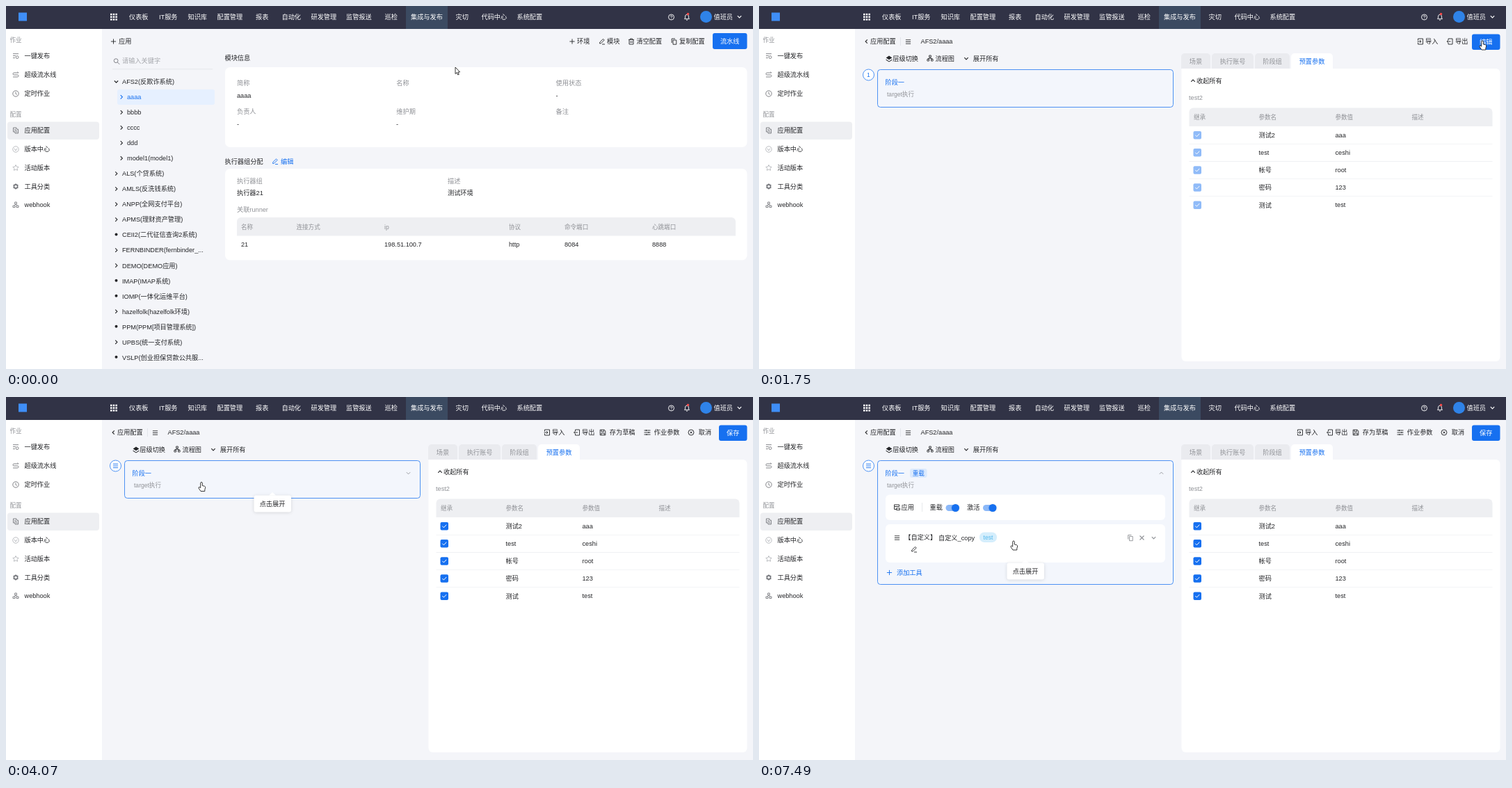
An HTML page with a canvas for the animation above (8000 ms loop, 1074 by 522 pixels).

```html
<!DOCTYPE html>
<html lang="zh-CN">
<head>
<meta charset="utf-8">
<title>应用配置</title>
<style>
html, body { margin: 0; width: 100%; height: 100%; overflow: hidden; background: #f4f5f9; }
canvas { display: block; }
</style>
</head>
<body>
<canvas id="stage" width="1074" height="522"></canvas>
<script>
const ctx = document.getElementById('stage').getContext('2d');
const LOOP = 8000;
const FONT = '"Liberation Sans", Arial, "Noto Sans CJK SC", "Noto Sans CJK", sans-serif';
const SIZE = 9.2, SMALL = 8.55;
const BLUE = '#1670f0', INK = '#252629', GREY = '#909297', BG = '#f4f5f9', HEAD = '#eeeff2';

// Line icons, centred on 0,0
const ICONS = {
  plus: 'M-3.6 0H3.6M0-3.6V3.6',
  down: 'M-2.7-1.3L0 1.4 2.7-1.3',
  up: 'M-2.7 1.3L0-1.4 2.7 1.3',
  right: 'M-1.3-2.7L1.4 0-1.3 2.7',
  left: 'M1.3-2.7L-1.4 0 1.3 2.7',
  menu: 'M-3.6-2.7H3.6M-3.6 0H3.6M-3.6 2.7H3.6',
  pencil: 'M-3.2 1L1.6-3.6 3.2-2-1.5 2.7-3.4 3ZM0 4H4',
  trash: 'M-4-2.6H4M-1.5-2.6V-4H1.5V-2.6M-3-2.6V4H3V-2.6M-1-.5V2M1-.5V2',
  copy: 'M-1.5-2H3.3V4.2H-1.5ZM-3.3 2V-4H1.5',
  search: 'M2-.8A2.9 2.9 0 1 1-3.8-.8 2.9 2.9 0 1 1 2-.8M1.3 1.4L4.3 4.4',
  enter: 'M-3.5-1.5V-4H3.5V4H-3.5V1.5M-4.4 0H1M-.8-1.8L1 0-.8 1.8',
  leave: 'M-2.5-2V-4H3.5V4H-2.5V2M1 0H-4.4M-2.6-1.8L-4.4 0-2.6 1.8',
  save: 'M-3.8-3.8H2.2L3.8-2.2V3.8H-3.8ZM-2-3.8V-1.2H1.6V-3.8M-2.2 3.8V1H2.2V3.8',
  sliders: 'M-4.5-3H4.5M-4.5 0H4.5M-4.5 3H4.5M-1.5-4V-2M2-1V1M-1 2V4',
  cancel: 'M4 0A4 4 0 1 1-4 0 4 4 0 1 1 4 0M-1.5-1.5L1.5 1.5M1.5-1.5L-1.5 1.5',
  cross: 'M-3-3L3 3M3-3L-3 3',
  flow: 'M-1.3-4H1.3V-1.4H-1.3ZM0-1.4V.3M-2.8 1.5V.3H2.8V1.5M-4.1 1.5H-1.5V4H-4.1ZM1.5 1.5H4.1V4H1.5Z',
  help: 'M4 0A4 4 0 1 1-4 0 4 4 0 1 1 4 0M-1.4-.8Q-1.3-2.2 0-2.2 1.4-2.2 1.4-1 1.4-.2 0 .6V1M0 2V2.6',
  bell: 'M-3.4 2.6H3.4L2.5 1V-1.2Q2.3-3.6 0-3.6-2.3-3.6-2.5-1.2V1ZM-1 4.2H1',
  tasks: 'M-4-3.3H4M-4-.4H0M-4 2.6H-1M4 1.6A1.9 1.9 0 1 1 .2 1.6 1.9 1.9 0 1 1 4 1.6',
  swap: 'M4-3H-2.4Q-4-3-4-1.4T-2.4 0H2.4Q4 0 4 1.5T2.4 3H-4M2.5-4.3L4-3',
  clock: 'M4.2 0A4.2 4.2 0 1 1-4.2 0 4.2 4.2 0 1 1 4.2 0M0-2.5V.3L1.8 1.4',
  doc: 'M-3.5-4H1V-1.8H3.5V4H-1V2H-3.5ZM-1.8-1.5H0M-1.8.4H1.8M.4 2.2H2.2',
  version: 'M4.2 0A4.2 4.2 0 1 1-4.2 0 4.2 4.2 0 1 1 4.2 0M-2-1.2L0 2 2-1.2',
  star: 'M0-4L1.3-1.4 4.1-1 2.1 1 2.6 3.8 0 2.5-2.6 3.8-2.1 1-4.1-1-1.3-1.4Z',
  gear: 'M2.6 0A2.6 2.6 0 1 1-2.6 0 2.6 2.6 0 1 1 2.6 0M0-4V-2.6M0 4V2.6M-3.5-2L-2.2-1.3M3.5 2L2.2 1.3M-3.5 2L-2.2 1.3M3.5-2L2.2-1.3',
  nodes: 'M-1.3-4H1.3V-1H-1.3ZM-4 1H-1V3.6H-4ZM1 1H4V3.6H1ZM0-1L-2 1M0-1L2 1',
  app: 'M-4-3.6H3V-1H-4ZM-4-1V3H-1M-1 1.4H4V4H-1Z',
  check: 'M-2.9-.2L-.8 2 3-2.1',
};
for (const k in ICONS) ICONS[k] = new Path2D(ICONS[k]);
const LAYERS = new Path2D('M0-4.4L4.4-1.6 0 1.2-4.4-1.6ZM-4.4.6L0 3.4 4.4.6V1.8L0 4.6-4.4 1.8Z');
const HAND = new Path2D('M-1.3 1.2Q-1.3 0 0 0 1.3 0 1.3 1.2V5L4.6 5.8Q5.9 6.3 5.6 8L4.8 10.8V13H-1L-4 8.6Q-4.2 6.6-2.6 7.1L-1.3 8.2Z');
const ARROW = new Path2D('M0 0V9.6L2.2 7.6 3.7 11 5.3 10.3 3.8 7H6.6Z');
const NOTCH = new Path2D('M-5 0L0-4.5 5 0Z');

function text(s, x, y, color = INK, size = SIZE, align = 'left') {
  ctx.font = size + 'px ' + FONT;
  ctx.textAlign = align;
  ctx.fillStyle = color;
  ctx.fillText(s, x, y + size * 0.365);
}
const small = (s, x, y, color = GREY, align) => text(s, x, y, color, SMALL, align);
const centred = (s, x, y, color) => text(s, x, y, color, SIZE, 'center');

function box(x, y, x2, y2, fill, r = 0, stroke) {
  ctx.beginPath();
  ctx.roundRect(x, y, x2 - x, y2 - y, r);
  if (fill) { ctx.fillStyle = fill; ctx.fill(); }
  if (stroke) { ctx.strokeStyle = stroke; ctx.lineWidth = 0.75; ctx.stroke(); }
}
function disc(x, y, r, fill, stroke) {
  box(x - r, y - r, x + r, y + r, fill, r, stroke);
}
function shape(path, x, y, fill, stroke, width = 1) {
  ctx.save();
  ctx.translate(x, y);
  if (fill) { ctx.fillStyle = fill; ctx.fill(path); }
  if (stroke) { ctx.strokeStyle = stroke; ctx.lineWidth = width; ctx.stroke(path); }
  ctx.restore();
}
const icon = (name, x, y, color = INK, width = 0.9) => shape(ICONS[name], x, y, null, color, width);
function tool(name, ix, label, tx, color = INK) {
  icon(name, ix, 51, color);
  text(label, tx, 51, color);
}
function button(x, y, x2, y2, label) {
  box(x, y, x2, y2, BLUE, 3);
  centred(label, (x + x2) / 2, (y + y2) / 2 + 0.3, '#fff');
}
function faded(alpha, draw) {
  if (alpha <= 0) return;
  ctx.save();
  ctx.globalAlpha *= alpha;
  draw();
  ctx.restore();
}
const ramp = (t, a, b) => Math.min(1, Math.max(0, (t - a) / (b - a)));

const MENU = [['仪表板', 177], ['IT服务', 220], ['知识库', 261.5], ['配置管理', 303.5], ['报表', 359],
  ['自动化', 396.5], ['研发管理', 438.5], ['监管报送', 489], ['巡检', 544.5], ['集成与发布', 582],
  ['灾切', 646.5], ['代码中心', 683.5], ['系统配置', 734.5]];

function header() {
  box(0, 0, 1074, 33, '#313346');
  box(575, 0, 635, 33, '#3b4a61');
  box(18, 9.5, 30, 21.5, '#3f8ef7');
  for (let i = 0; i < 9; i++) {
    const x = 150 + (i % 3) * 3.7, y = 10.8 + Math.floor(i / 3) * 3.7;
    box(x, y, x + 2.5, y + 2.5, '#fff');
  }
  for (const [s, x] of MENU) text(s, x, 15.5, '#fff');
  icon('help', 956.5, 16, '#fff');
  icon('bell', 979, 16, '#fff');
  disc(980.5, 11.5, 1.8, '#f04b4b');
  disc(1006.5, 15.5, 8.5, '#2f83e8');
  text('值班员', 1017.5, 15.5, '#fff');
  icon('down', 1054.5, 15.5, '#fff', 1.2);
}

const SIDE = [['tasks', '一键发布', 72], ['swap', '超级流水线', 99], ['clock', '定时作业', 126],
  ['doc', '应用配置', 179], ['version', '版本中心', 206], ['star', '活动版本', 232.5],
  ['gear', '工具分类', 259.5], ['nodes', 'webhook', 286]];

function sidebar(alpha) {
  box(0, 33, 138, 522, '#fff');
  box(2, 166.5, 134, 192, HEAD, 4);
  faded(alpha, () => {
    small('作业', 5.5, 49);
    small('配置', 5.5, 156);
    SIDE.forEach(([name, label, y], i) => {
      icon(name, 14, y, i > 3 && i < 6 ? '#b4b6ba' : '#75777c', name === 'gear' ? 1.6 : 0.9);
      text(label, 26.5, y);
    });
  });
}

// First character: v open, > closed, . leaf
const TREE = ['vAFS2(反欺诈系统)', ' aaaa', ' bbbb', ' cccc', ' ddd', ' model1(model1)', '>ALS(个贷系统)',
  '>AMLS(反洗钱系统)', '>ANPP(全网支付平台)', '>APMS(理财资产管理)', '.CEII2(二代征信查询2系统)',
  '>FERNBINDER(fernbinder_...', '>DEMO(DEMO应用)', '.IMAP(IMAP系统)', '.IOMP(一体化运维平台)',
  '>hazelfolk(hazelfolk环境)', '.PPM(PPM[项目管理系统])', '>UPBS(统一支付系统)', '.VSLP(创业担保贷款公共服...'];

function tree() {
  box(160, 120, 300, 142, '#e6f0ff', 3);
  TREE.forEach((row, i) => {
    const y = 108.8 + i * 22.03, kind = row[0], child = kind === ' ';
    const color = i === 1 ? BLUE : INK;
    if (kind === '.') disc(158.5, y - 0.5, 2, INK);
    else icon(kind === 'v' ? 'down' : 'right', child ? 166 : 158.5, y, color, 1.1);
    text(row.slice(1), child ? 174 : 167, y, color);
  });
}

function configPage() {
  tool('plus', 154.5, '应用', 162);
  icon('search', 159, 79.5, '#75777c');
  text('请输入关键字', 167, 79, '#a6a8ad');
  box(153, 90.5, 297, 91.3, '#dfe1e6');
  tree();
  tool('plus', 814, '环境', 821);
  tool('pencil', 857, '模块', 864);
  tool('trash', 899, '清空配置', 906.5);
  tool('copy', 960.5, '复制配置', 968);
  button(1016, 39, 1065.5, 62, '流水线');

  text('模块信息', 314.5, 74.5);
  box(315, 88, 1065.5, 203, '#fff', 7);
  [['简称', '名称', '使用状态'], ['负责人', '维护期', '备注']].forEach((row, j) =>
    row.forEach((s, i) => text(s, 332 + i * 229.3, 111 + j * 41, GREY)));
  text('aaaa', 332, 128.5);
  text('-', 790.5, 129);
  text('-', 332, 170);
  text('-', 561, 170);

  text('执行器组分配', 314.5, 223.5);
  icon('pencil', 387, 223.5, BLUE);
  text('编辑', 395, 223.5, BLUE);
  box(315, 234, 1065.5, 365.5, '#fff', 7);
  text('执行器组', 332, 252, GREY);
  text('描述', 635, 252, GREY);
  text('执行器21', 332, 269);
  text('测试环境', 635, 269);
  text('关联runner', 332, 293, GREY);
  box(332, 304, 1049, 330.5, HEAD, [6, 6, 0, 0]);
  const cols = [338, 417.5, 544, 723, 803, 929];
  ['名称', '连接方式', 'ip', '协议', '命令端口', '心跳端口'].forEach((s, i) => small(s, cols[i], 317.5));
  ['21', '', '198.51.100.7', 'http', '8084', '8888'].forEach((s, i) => text(s, cols[i], 342.2));
}

function toggle(x, on, pressed) {
  const width = pressed ? 15 : 11;
  const left = on ? x + 20.5 - width : x - 0.5;
  box(x + 1, 155, x + 20, 164, on ? '#8bb8f8' : '#e4e5e8', 4.5);
  ctx.save();
  ctx.shadowColor = 'rgba(0,0,0,.14)';
  ctx.shadowBlur = 2;
  box(left, 154, left + width, 165, on ? BLUE : '#fff', 5.5);
  ctx.restore();
}

function tooltip(label, y, alpha = 1) {
  faded(alpha, () => {
    ctx.save();
    ctx.shadowColor = 'rgba(0,0,0,.13)';
    ctx.shadowBlur = 5;
    ctx.shadowOffsetY = 0.7;
    box(356.5, y - 12, 410, y + 12, '#fff', 3);
    ctx.restore();
    shape(NOTCH, 383, y - 12, '#fff');
    centred(label, 383, y, INK);
  });
}

function stageCard(t, cur) {
  const over = t >= 4070, open = t >= 4300;
  const grown = t >= 4450 ? 1 : t >= 4370 ? 0.75 : open ? 0.35 : 0;
  const reload = t >= 6770, tagged = t >= 6850;
  const hover = tagged && cur.y > 183;
  const bottom = Math.round(145 + 111 * grown + (tagged ? 13 : 0)) + 0.5;

  disc(157.5, 99, 8, '#fff', BLUE);
  if (over) icon('menu', 157.5, 99, BLUE);
  else small('1', 157.3, 99, BLUE, 'center');

  box(170.5, 91.5, 595.5, bottom, '#f3f6fc', 4, BLUE);
  text('阶段一', 181.5, 109.5, BLUE);
  small('target执行', 184, 126.5);
  if (over) icon(open ? 'up' : 'down', 578.5, 109.5, GREY);
  if (tagged) {
    box(217, 103, 241.5, 116, '#dceafd', 3);
    small('重载', 229.2, 109.5, BLUE, 'center');
  }
  if (open) {
    ctx.save();
    ctx.beginPath();
    ctx.rect(171, 130, 424, bottom - 131);
    ctx.clip();
    box(182, 140.5, 584, 177, '#fff', 6);
    icon('app', 198.5, 158.5);
    text('应用', 204.5, 158.5);
    box(234, 152, 234.8, 165, '#e2e4e8');
    text('重载', 245.5, 159);
    toggle(267.5, reload, t >= 6470 && !reload);
    text('激活', 299, 159);
    toggle(321, true);
    box(182, 183, 584, 238, '#fff', 6);
    text('【自定义】', 209.3, 202);
    text('自定义_copy', 258, 202.5);
    box(317, 194.5, 342, 209, '#d5eefc', 7);
    small('test', 329.5, 202, '#54b9ee', 'center');
    if (hover) {
      icon('menu', 198.5, 202.5);
      icon('pencil', 223, 219);
      icon('copy', 534, 202.5, GREY);
      icon('cross', 550.5, 202.5, GREY, 1.1);
      icon('down', 567.5, 202.5, GREY, 1.2);
    } else {
      small('#1', 193, 202);
      small('-', 214, 221);
    }
    if (tagged) {
      icon('plus', 187.5, 252.5, BLUE);
      text('添加工具', 198, 252.5, BLUE);
    }
    ctx.restore();
  }
  if (over) tooltip(open ? '点击收起' : '点击展开', 153.5, 1 - ramp(t, 5500, 5690));
  if (hover && t >= 7410) tooltip('点击展开', 250.5);
}

const TABS = [['场景', 607, 649], ['执行账号', 651, 711], ['阶段组', 713, 763], ['预置参数', 765, 825]];
const PARAMS = [['测试2', 'aaa'], ['test', 'ceshi'], ['帐号', 'root'], ['密码', '123'], ['测试', 'test']];

function tabs(n) {
  TABS.slice(0, n).forEach(([s, a, b], i) => {
    box(a, 68, b, 90, i === 3 ? '#fff' : '#eaebef', [5, 5, 0, 0]);
    centred(s, (a + b) / 2, 79.5, i === 3 ? BLUE : GREY);
  });
}

function params(t) {
  tabs(4);
  box(607.5, 90, 1065.5, 511, '#fff', [0, 6, 6, 6]);
  icon('up', 624, 107.5, INK, 1.1);
  text('收起所有', 629, 107.5);
  text('test2', 618, 132, GREY);
  box(618.5, 146.5, 1054.5, 173, HEAD, [6, 6, 0, 0]);
  const cols = [625, 718.5, 828.5, 938.5];
  ['继承', '参数名', '参数值', '描述'].forEach((s, i) => small(s, cols[i], 160));
  const strength = 0.48 + 0.52 * ramp(t, 2540, 2760);
  PARAMS.forEach(([name, value], i) => {
    const y = 185.8 + i * 25.1;
    faded(strength, () => box(624.5, y - 5.8, 636, y + 5.7, BLUE, 2));
    icon('check', 630.2, y, '#fff', 1);
    text(name, cols[1], y);
    text(value, cols[2], y - 0.3);
    if (i < 4) box(618.5, y + 12.2, 1054.5, y + 13, '#eff0f3');
  });
}

function pipelineTools(t) {
  if (t < 2530) {
    tool('enter', 951, '导入', 958);
    tool('leave', 993.5, '导出', 1001);
  } else {
    const fresh = t < 2620, dx = fresh ? 6 : 0;
    tool('enter', 778 + dx, '导入', 785 + dx);
    tool('leave', 821 + dx, '导出', 828 + dx);
    tool('save', 858 + dx, '存为草稿', 867.8 + dx, fresh ? BLUE : INK);
    tool('sliders', 922, '作业参数', 931.8);
    tool('cancel', 985, '取消', 995.8);
  }
  button(1025, 40.5, 1065.5, 63, t < 2530 ? '编辑' : '保存');
}

function pipelinePage(t, cur) {
  const ready = t >= 1590;
  faded(ready ? 1 : t < 1520 ? 0.1 : 0.55, () => {
    icon('left', 154.5, 51, INK, 1.1);
    text('应用配置', 160, 51);
    box(203, 45, 203.8, 57, '#dfe1e6');
    icon('menu', 214.5, 51.5);
    text(ready ? 'AFS2/aaaa' : '应用系统', 232.5, 51);
    pipelineTools(t);
    if (!ready) tabs(3);
  });
  if (ready) {
    shape(LAYERS, 187, 76, INK);
    text('层级切换', 192.3, 76);
    icon('flow', 246, 75);
    text('流程图', 253.5, 75.5);
    icon('down', 298, 75.5, INK, 1.1);
    text('展开所有', 307.8, 75.5);
    params(t);
    stageCard(t, cur);
  } else if (t < 1520) {
    const a = t / 160;
    ctx.beginPath();
    ctx.arc(607.3, 271, 5.5, a, a + 5);
    ctx.strokeStyle = BLUE;
    ctx.lineWidth = 1;
    ctx.stroke();
    centred('加载中', 607.3, 285, BLUE);
  }
}

// start, end, steps, x, y
const MOVES = [[410, 490, 2, 674, 85], [870, 1190, 5, 1040, 50], [3610, 4070, 7, 281, 122.5],
  [5460, 5460, 1, 269, 127], [5540, 5620, 2, 238, 143], [5690, 6000, 5, 272, 150],
  [6160, 6240, 2, 281, 157], [6930, 7490, 8, 366, 207]];

function cursorAt(t) {
  let x = 646, y = 88;
  for (const [start, end, n, tx, ty] of MOVES) {
    if (t < start) break;
    const step = start === end ? 1 : Math.floor((t - start) / (end - start) * (n - 1) + 1.001);
    const p = Math.min(1, step / n), k = p * p * (3 - 2 * p);
    x += (tx - x) * k;
    y += (ty - y) * k;
  }
  const travelling = t >= 3610 && x > 595;
  return { x, y, hand: (t >= 1190 && t < 1350) || (t >= 1750 && !travelling) };
}

function draw(t) {
  const cur = cursorAt(t);
  box(0, 0, 1074, 522, BG);
  header();
  sidebar(t >= 1350 && t < 1430 ? 0.6 : 1);
  if (t < 1350) configPage();
  else pipelinePage(t, cur);
  shape(cur.hand ? HAND : ARROW, cur.x, cur.y, '#fff', '#222', 0.9);
}

function tick(now) {
  draw(now % LOOP);
  requestAnimationFrame(tick);
}
requestAnimationFrame(tick);
</script>
</body>
</html>
```
